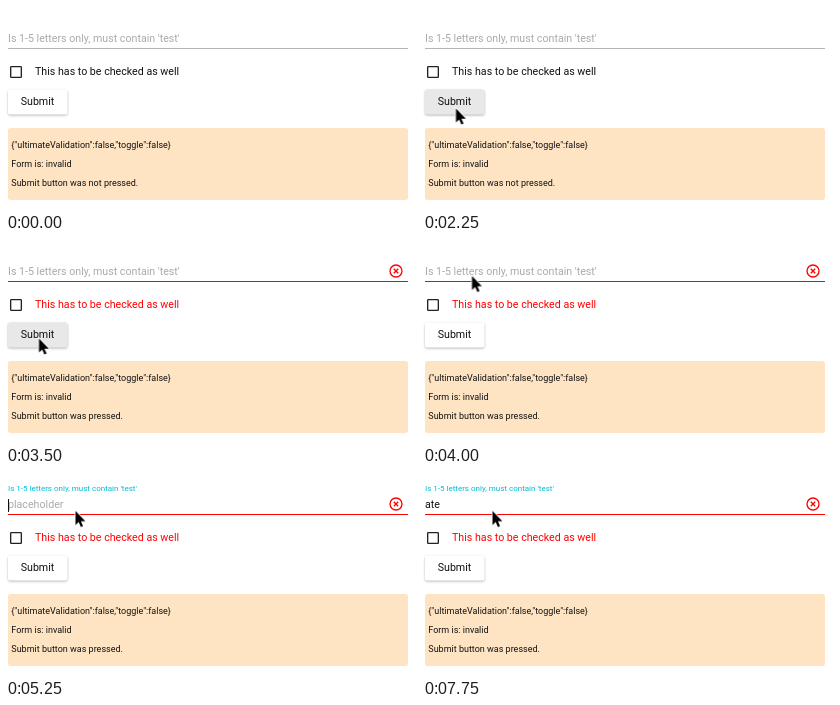
Write an HTML page that moves like this. It is 411 px wide and 205 px high and loops after 8000 ms.

```html
<!DOCTYPE html>
<html lang="en">
<head>
<meta charset="utf-8">
<title>Form validation</title>
<style>
html, body { margin: 0; width: 100%; height: 100%; overflow: hidden; background: #fff; }
svg { display: block; width: 411px; height: 205px; }
text { font: 10.667px Roboto, sans-serif; fill: #111; white-space: pre; }
.log text { font-size: 9px; }

/* Everything shares one 8 s clock and changes on a 250 ms beat. */
.a { animation: 8s step-end infinite; }

.line { animation-name: line; }
.check { animation-name: check; }
.error, .after { animation-name: submitted; }
.before { animation-name: unsubmitted; }
.button { animation-name: hover; filter: drop-shadow(0 1px 1px rgba(0, 0, 0, .28)); }
.label { animation-name: float; }
.hint { fill: #aaa; animation-name: hint; }
.key { animation-name: key1; }
.key2 { animation-name: key2; }
.key3 { animation-name: key3; }
.caret { animation-name: blink; }
.caret rect { animation-name: advance; }
.cursor { animation-name: move; }

@keyframes line { 0% { fill: #b4b4b4 } 37.5%, 100% { fill: #f00 } }
@keyframes check { 0% { fill: #111 } 37.5%, 100% { fill: #f00 } }
@keyframes submitted { 0% { opacity: 0 } 37.5%, 100% { opacity: 1 } }
@keyframes unsubmitted { 0% { opacity: 1 } 37.5%, 100% { opacity: 0 } }
@keyframes hover {
  0% { fill: #fff }
  25% { fill: #f0f0f0 }
  28.125% { fill: #e8e8e8 }
  46.875%, 100% { fill: #fff }
}
@keyframes float {
  0% { fill: #aaa; transform: translate(2px, 36px) }
  62.5% { fill: #5cb8c4; transform: translate(2px, 27.5px) scale(.875) }
  65.625%, 100% { fill: #00bcd4; transform: translate(2px, 19.4px) scale(.75) }
}
@keyframes hint { 0% { opacity: 0 } 65.625% { opacity: 1 } 81.25%, 100% { opacity: 0 } }
@keyframes key1 { 0% { opacity: 0 } 81.25%, 100% { opacity: 1 } }
@keyframes key2 { 0% { opacity: 0 } 84.375%, 100% { opacity: 1 } }
@keyframes key3 { 0% { opacity: 0 } 90.625%, 100% { opacity: 1 } }
@keyframes blink {
  0% { opacity: 0 }
  65.625% { opacity: 1 }
  71.875% { opacity: 0 }
  78.125% { opacity: 1 }
  96.875%, 100% { opacity: 0 }
}
@keyframes advance {
  0% { transform: translateX(0) }
  81.25% { transform: translateX(6px) }
  84.375% { transform: translateX(9px) }
  90.625%, 100% { transform: translateX(15px) }
}
@keyframes move {
  0% { transform: translate(-50px, -50px) }
  3.125% { transform: translate(129px, 4px); animation-timing-function: steps(4, end) }
  15.625% { transform: translate(69px, 33px); animation-timing-function: steps(4, end) }
  28.125% { transform: translate(32.5px, 102px) }
  40.625% { transform: translate(32.5px, 99px) }
  43.75% { transform: translate(32.5px, 99px); animation-timing-function: steps(2, end) }
  50% { transform: translate(48.5px, 36.5px); animation-timing-function: steps(3, end) }
  59.375%, 100% { transform: translate(69px, 38.5px) }
}
</style>
</head>
<body>
<svg viewBox="0 0 411 205">
  <text class="a label">Is 1-5 letters only, must contain 'test'</text>
  <text class="a hint" x="2" y="36">placeholder</text>
  <text x="2" y="36"><tspan> </tspan></text>
  <text class="a key" x="2" y="36">a</text>
  <text class="a key key2" x="7.8" y="36">t</text>
  <text class="a key key3" x="11.3" y="36">e</text>
  <g class="a caret"><rect class="a" x="2" y="27" width="1" height="13" fill="#111"/></g>
  <rect class="a line" x="2" y="42" width="400" height="1"/>
  <g class="a error" fill="none" stroke="#f00" stroke-width="1.33">
    <circle cx="390" cy="32" r="6"/>
    <path d="M387.8 29.8l4.4 4.4m0-4.4l-4.4 4.4"/>
  </g>

  <rect x="4.67" y="60.67" width="10.67" height="10.67" rx=".7" fill="none" stroke="#222" stroke-width="1.33"/>
  <text class="a check" x="29" y="69">This has to be checked as well</text>

  <rect class="a button" x="2" y="83.5" width="59.5" height="25" rx="2"/>
  <text x="14.7" y="99.3">Submit</text>

  <rect x="2" y="122" width="400" height="72" rx="2.7" fill="#ffe4c4"/>
  <g class="log">
    <text x="5.3" y="142">{"ultimateValidation":false,"toggle":false}</text>
    <text x="5.3" y="161">Form is: invalid</text>
    <text class="a before" x="5.3" y="180">Submit button was not pressed.</text>
    <text class="a after" x="5.3" y="180">Submit button was pressed.</text>
  </g>

  <g class="a cursor">
    <path d="M.5 .5v14l3.2-3 2.2 5 2.2-.9-2.2-4.9h4.5z" fill="#000" stroke="#fff" stroke-width="1.6" paint-order="stroke"/>
  </g>
</svg>
</body>
</html>
```
